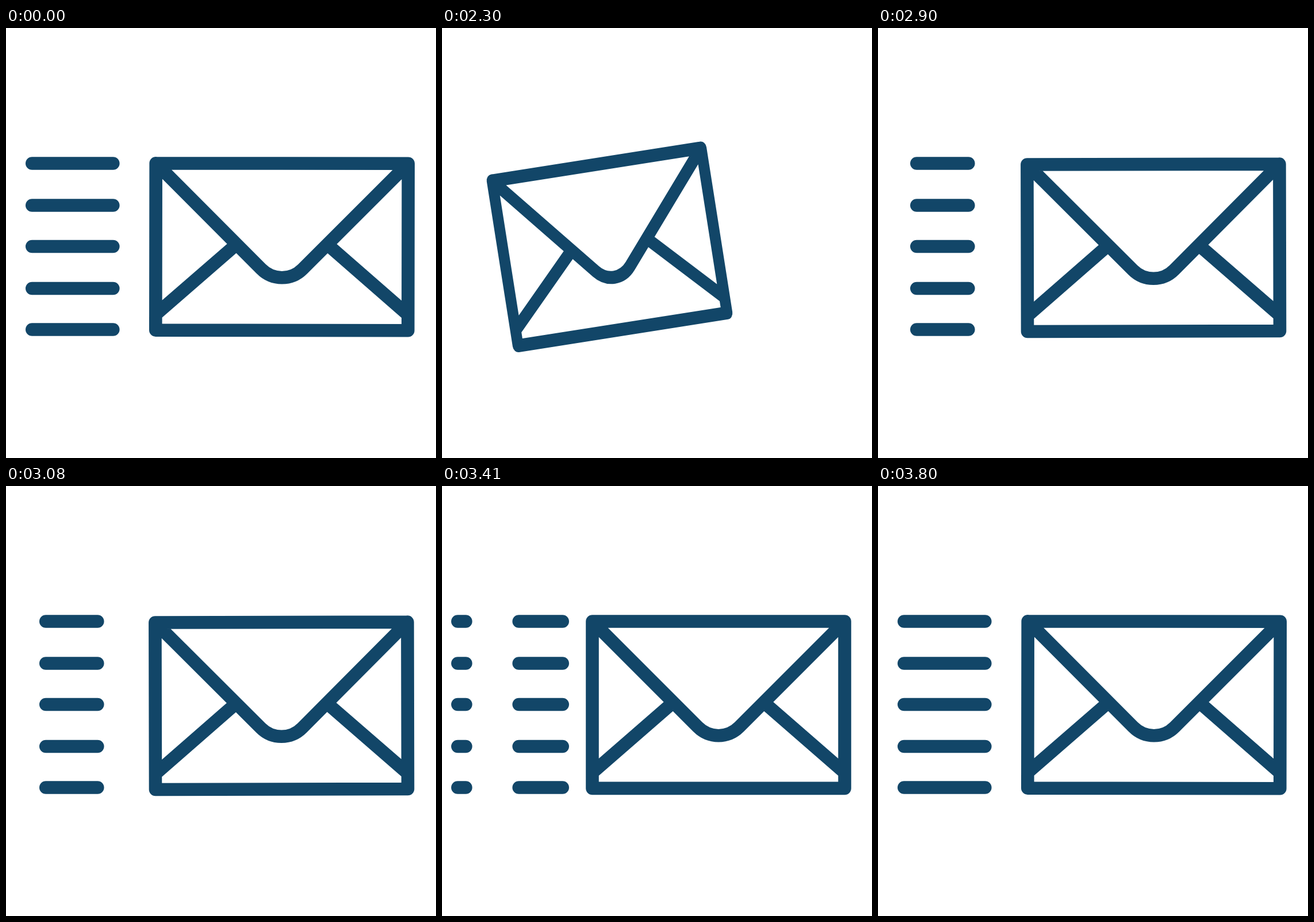
Recreate the animation shown at these times as an HTML page with a canvas. Size 748 px wide and 748 px high, loop 3.83 s.

```html
<!DOCTYPE html>
<html lang="en">
<head>
<meta charset="utf-8">
<title>Sending mail</title>
<style>
  html, body { margin: 0; width: 100%; height: 100%; overflow: hidden; background: #fff; }
  canvas { display: block; width: 748px; height: 748px; }
</style>
</head>
<body>
<canvas id="stage" width="748" height="748"></canvas>
<script>
const ctx = document.getElementById('stage').getContext('2d');
const LOOP = 3830, HOLD = 2030, STEP = 30, LAST = 59;
const INK = '#124668', WEIGHT = 22.6;

// Speed lines: a dash that runs left and wraps inside a fixed track
const TRACK_X = 27.3, TRACK = 182.4;
const ROWS = [235.5, 308.5, 380, 453, 524.5];

// Envelope at rest
const CX = 481, CY = 380.7, HALF_W = 219.5, HALF_H = 145.2;

const clamp = v => Math.max(0, Math.min(1, v));
const mod = (a, b) => ((a % b) + b) % b;

// 0 = at rest on the right, 1 = fully pulled back
function pull(k) {
  if (k === LAST) return 0;
  const t = HOLD + k * STEP;
  if (t < 2500) return 1 - 0.586 * (1 - (t - HOLD) / 470) ** 2;
  return (1 + Math.cos(Math.PI * clamp((t - 2500) / 280))) / 2;
}

// Small tremble while the envelope is flying
function tremble(k) {
  if (k === LAST) return [-1, 0, 0.08];
  if (k < 27) return [0, 0, 0];
  return [[-0.8, 0.8, -0.07], [0, 0, 0], [-1.8, 1.6, -0.12]][k % 3];
}

function dash(k) {
  if (k === LAST) return [18, 141];
  if (k < 19) return [18, 77 * (1 - clamp(k / 8)) ** 2];
  return [mod(40 - 60.47 * (k - 29), TRACK), 90 * clamp((k - 22) / 5)];
}

function segment(from, to, y) {
  ctx.moveTo(TRACK_X + from, y);
  ctx.lineTo(TRACK_X + to, y);
}

function drawLines(k) {
  const [start, length] = dash(k);
  if (length < 0.5) return;
  const end = start + length;
  ctx.beginPath();
  for (const y of ROWS) {
    segment(start, Math.min(end, TRACK), y);
    if (end > TRACK) segment(0, end - TRACK, y);
  }
  ctx.stroke();
}

function drawEnvelope(k) {
  const p = pull(k), [dx, dy, tilt] = tremble(k);
  const r = 50.7, c = r * Math.SQRT1_2, mid = 2.8;

  ctx.save();
  ctx.translate(CX - 212 * p + dx, CY + dy);
  ctx.rotate((tilt - 10 * p) * Math.PI / 180);
  ctx.scale(1 - 0.181 * p, 1);
  ctx.beginPath();
  ctx.rect(-HALF_W, -HALF_H, 2 * HALF_W, 2 * HALF_H);
  ctx.moveTo(-HALF_W, -HALF_H);
  ctx.lineTo(-c, mid + c);
  ctx.arc(0, mid, r, Math.PI * 0.75, Math.PI * 0.25, true);
  ctx.lineTo(HALF_W, -HALF_H);
  for (const side of [-1, 1]) {
    ctx.moveTo(side * HALF_W, 118);
    ctx.lineTo(side * 79, -4.3);
  }
  ctx.stroke();
  ctx.restore();
}

function draw(time) {
  const t = mod(time, LOOP);
  const k = t < HOLD ? LAST : Math.min(LAST, Math.floor((t - HOLD) / STEP + 0.001));
  ctx.fillStyle = '#fff';
  ctx.fillRect(0, 0, 748, 748);
  ctx.strokeStyle = INK;
  ctx.lineWidth = WEIGHT;
  ctx.lineCap = ctx.lineJoin = 'round';
  drawLines(k);
  drawEnvelope(k);
}

const begin = performance.now();
function tick() {
  draw(performance.now() - begin);
  requestAnimationFrame(tick);
}
tick();
</script>
</body>
</html>
```
